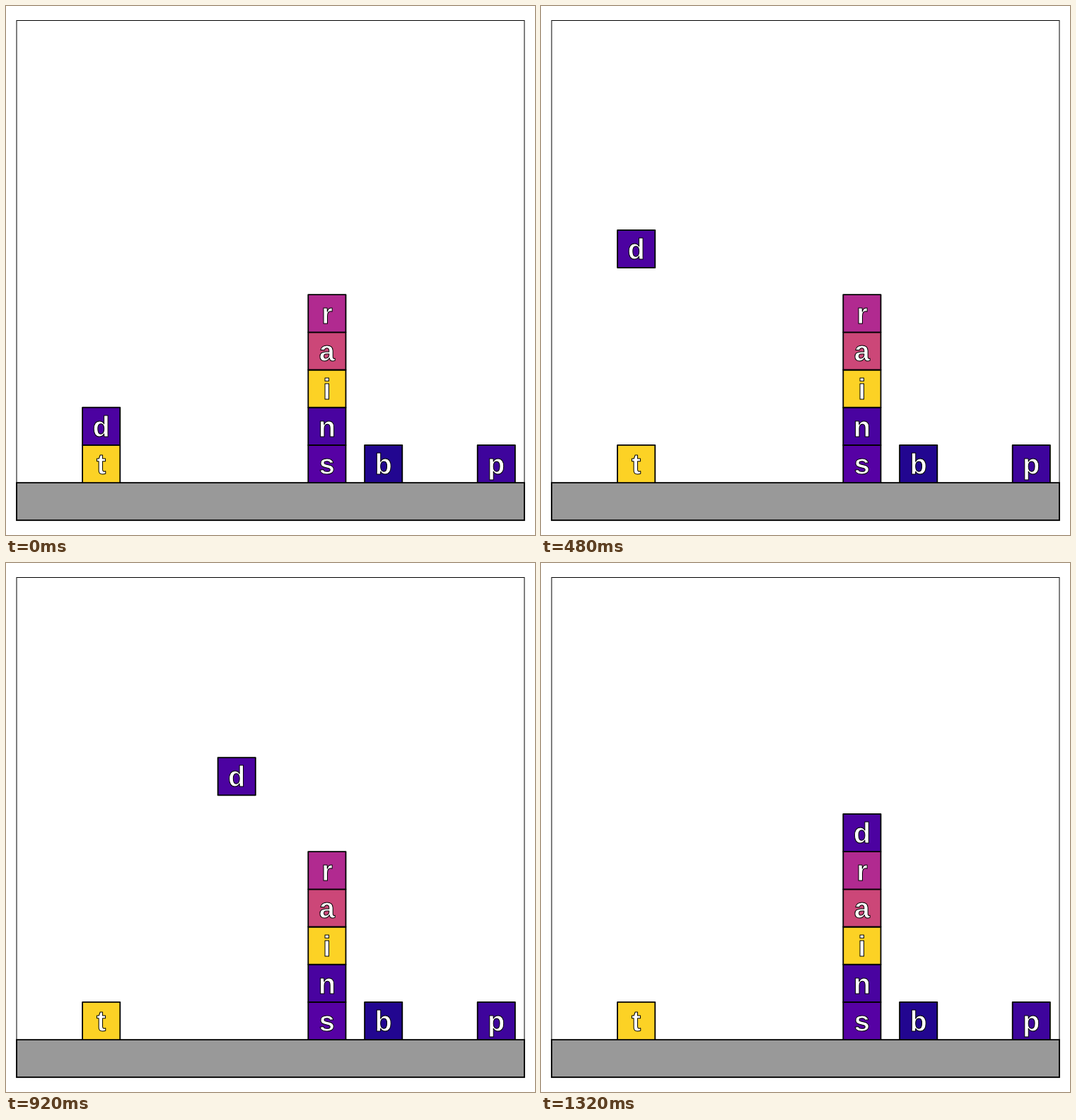
An HTML page with a canvas for the animation above (1360 ms loop, 748 by 748 pixels).

```html
<!DOCTYPE html>
<html lang="en">
<head>
<meta charset="utf-8">
<style>
  html, body { margin: 0; width: 100%; height: 100%; overflow: hidden; background: #fff; }
  canvas { display: block; }
</style>
</head>
<body>
<canvas id="stage" width="748" height="748"></canvas>
<script>
const ctx = document.getElementById('stage').getContext('2d');
const UNIT = 53.2, LEFT = 15, RIGHT = 733, TOP = 20.5, GROUND = 674.1, BOTTOM = 727.2;
const STEP_MS = 40, STEPS = 34;
const LIFT = 14, CARRY = 15, LOWER = 4;

// letter, colour, column, level
const blocks = [
  ['t', '#fcd225', 0, 0],
  ['s', '#5601a4', 4, 0],
  ['n', '#4903a0', 4, 1],
  ['i', '#fcd225', 4, 2],
  ['a', '#cc4778', 4, 3],
  ['r', '#b12a90', 4, 4],
  ['b', '#220690', 5, 0],
  ['p', '#3e049c', 7, 0]
];

const clamp01 = v => Math.max(0, Math.min(1, v));

function drawBlock(letter, color, column, level) {
  const x = LEFT + UNIT * (1.75 + 1.5 * column);
  const y = GROUND - UNIT * (level + 1);
  ctx.fillStyle = color;
  ctx.lineWidth = 1.8;
  ctx.fillRect(x, y, UNIT, UNIT);
  ctx.strokeRect(x, y, UNIT, UNIT);
  ctx.fillStyle = '#fff';
  ctx.lineWidth = 1;
  ctx.fillText(letter, x + UNIT / 2, y + 41);
  ctx.strokeText(letter, x + UNIT / 2, y + 41);
}

function drawScene(step) {
  ctx.fillStyle = '#fff';
  ctx.fillRect(0, 0, 748, 748);
  ctx.strokeStyle = '#000';
  ctx.lineJoin = 'miter';
  ctx.fillStyle = '#999';
  ctx.fillRect(LEFT, GROUND, RIGHT - LEFT, BOTTOM - GROUND);
  ctx.lineWidth = 1.8;
  ctx.strokeRect(LEFT, GROUND, RIGHT - LEFT, BOTTOM - GROUND);
  ctx.lineWidth = 1;
  ctx.strokeRect(LEFT, TOP, RIGHT - LEFT, BOTTOM - TOP);

  ctx.font = 'bold 39.9px "Liberation Sans", Helvetica, Arial, sans-serif';
  ctx.textAlign = 'center';
  ctx.lineJoin = 'round';
  blocks.forEach(block => drawBlock(...block));

  const lift = clamp01(step / LIFT);
  const carry = clamp01((step - LIFT) / CARRY);
  const lower = clamp01((step - LIFT - CARRY) / LOWER);
  drawBlock('d', '#4c02a1', 4 * carry, 1 + 5.5 * lift - 1.5 * lower);
}

const start = performance.now();
function tick() {
  drawScene(Math.floor((performance.now() - start) / STEP_MS) % STEPS);
  requestAnimationFrame(tick);
}
tick();
</script>
</body>
</html>
```
